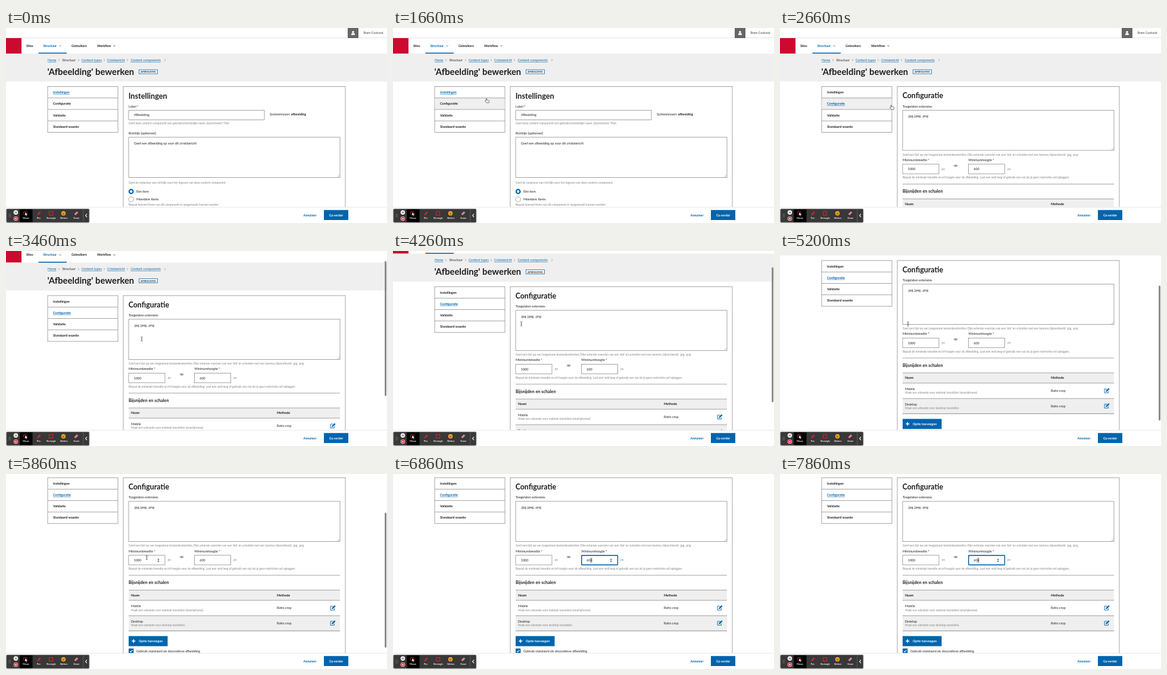
An HTML page for the animation above (8 s loop, 640x328 px).

```html
<!DOCTYPE html>
<html lang="nl">
<head>
<meta charset="utf-8">
<title>Afbeelding bewerken</title>
<style>
  html, body { margin: 0; width: 100%; height: 100%; overflow: hidden; background: #fff; }
  svg { display: block; width: 100vw; height: 100vh; }
  text { font-family: Lato, "Open Sans", sans-serif; white-space: pre; }
</style>
</head>
<body>
<svg id="stage" viewBox="0 0 640 328"></svg>
<script>
const BLUE = '#0064ad', INK = '#1f1f1f', GREY = '#858585', PALE = '#efefef', LINE = '#8c8c8c', RED = '#d0021b';
const LOOP = 8000;

// y is the vertical middle of the capitals
const text = (x, y, str, size = 5.45, fill = INK, extra = '') =>
  `<text x="${x}" y="${y + size * .36}" font-size="${size}" fill="${fill}" ${extra}>${str}</text>`;
const bold = (x, y, str, size = 5.45, fill = INK, extra = '') =>
  text(x, y, str, size, fill, 'font-weight="700" ' + extra);
const hint = (x, y, str) => text(x, y, str, 4.8, GREY);
const rect = (x, y, w, h, fill, extra = '') =>
  `<rect x="${x}" y="${y}" width="${w}" height="${h}" fill="${fill}" ${extra}/>`;
const box = (x, y, w, h, stroke = LINE, width = .8) =>
  rect(x, y, w, h, '#fff', `stroke="${stroke}" stroke-width="${width}"`);
const path = (d, stroke, width = 1, extra = 'fill="none"') =>
  `<path d="${d}" stroke="${stroke}" stroke-width="${width}" ${extra}/>`;
const circle = (x, y, r, fill, extra = '') => `<circle cx="${x}" cy="${y}" r="${r}" fill="${fill}" ${extra}/>`;
const group = (id, inner, extra = '') => `<g id="${id}" ${extra}>${inner}</g>`;
const link = (x, y, str) => text(x, y, str, 5.45, BLUE, 'text-decoration="underline"');
const required = (x, y, str) =>
  text(x, y, `${str} <tspan fill="${RED}" font-weight="700">*</tspan>`);
const down = (x, y, color) => path(`M${x - 1.5} ${y - .7}l1.5 1.5l1.5 -1.5`, color, .8);
const grip = (x, y) => path(`M${x - 4} ${y}l4 -4m-2 4l2 -2`, '#888', .5);

function header() {
  const chevrons = [89, 122, 165, 204, 267]
    .map(x => path(`M${x - .8} 52.4l1.6 1.6l-1.6 1.6`, '#666', .6)).join('');
  return rect(0, 0, 640, 43, '#fff') + rect(0, 16, 640, .8, '#dcdcdc')
    + rect(574, 0, 18, 17, '#666') + circle(583, 6.7, 1.8, '#fff')
    + path('M580 11.8v-1.2q0-2 2-2h2q2 0 2 2v1.2z', 'none', 0, 'fill="#fff"')
    + text(600.5, 8.2, 'Bram Coolvest', 5.2, '#444')
    + rect(0, 17, 26, 26, '#cc0a2f')
    + bold(34, 30, 'Sites') + bold(62.5, 30, 'Structuur', 5.4, BLUE) + down(91, 30, BLUE)
    + bold(110, 30, 'Gebruikers', 5.3) + bold(153, 30, 'Workflow', 5.3) + down(182, 30, INK)
    + rect(0, 43, 640, 47, PALE) + rect(54.5, 41.5, 47.5, 1.6, BLUE)
    + link(70, 54, 'Home') + text(94.5, 54, 'Structuur') + link(127, 54, 'Content types')
    + link(170, 54, 'Crisisbericht') + link(209.5, 54, 'Content components') + chevrons
    + bold(69.5, 73.6, "'Afbeelding' bewerken", 14.8)
    + box(223.4, 70.2, 31, 6.8, BLUE) + bold(226, 73.7, 'AFBEELDING', 4.2);
}

function menu(active) {
  const rows = ['Instellingen', 'Configuratie', 'Validatie', 'Standaard waarde'];
  return box(70, 98.5, 118, 77) + rows.map((name, i) => {
    const y = 98.5 + 19.25 * i;
    const style = i === active ? 'text-decoration="underline"' : '';
    return (i === 1 ? rect(70.4, y + .4, 117.2, 18.5, PALE, `class="hover" visibility="hidden"`) : '')
      + (i ? rect(70, y - .4, 118, .8, LINE) : '')
      + bold(79, y + 9.6, name, 5.45, i === active ? BLUE : INK, style);
  }).join('');
}

function settings() {
  return menu(0) + box(197, 98.5, 373, 400)
    + bold(205.7, 114.2, 'Instellingen', 12.7)
    + required(206, 131.6, 'Label')
    + box(206, 138.3, 228, 16.2) + text(215, 146.3, 'Afbeelding')
    + text(443, 145.2, 'Systeemnaam: <tspan font-weight="700">afbeelding</tspan>')
    + hint(206, 160.2, "Geef deze content component een gebruiksvriendelijke naam, bijvoorbeeld 'Titel'.")
    + text(206, 177.4, 'Richtlijn (optioneel)')
    + box(206, 183.8, 355, 67.6) + grip(560.4, 250.8)
    + text(215, 194, 'Geef een afbeelding op voor dit crisisbericht')
    + hint(206, 260, 'Geef de redacteur een richtlijn voor het ingeven van deze content component.')
    + circle(210.2, 275, 3.3, '#fff', `stroke="${BLUE}" stroke-width="2.2"`) + text(219, 275, 'Eén item')
    + circle(210.2, 288, 4.1, '#fff', `stroke="${LINE}" stroke-width=".7"`) + text(219, 288, 'Meerdere items')
    + hint(206, 297.4, 'Bepaal hoeveel items van dit component er aangemaakt kunnen worden');
}

const spinner = (id, x) => group(id,
  path(`M${x - 1.5} 236.6l1.5 -2l1.5 2zm0 1.6l1.5 2l1.5 -2z`, 'none', 0, `fill="${INK}"`), 'visibility="hidden"');

function numberField(x, label, value) {
  return required(x, 222, label) + box(x, 229, 61, 16.2)
    + text(x + 8.8, 237.3, value) + hint(x + 65.8, 237, 'px');
}

function option(y, name, target) {
  return text(210, y, name) + hint(210, y + 6.4, `Maak een uitsnede voor ${target}`)
    + text(455, y + 2.9, 'Ratio crop')
    + path(`M549.5 ${y - .2}h-4.4v6.6h6.4v-3`, BLUE, .9)
    + path(`M547.6 ${y + 4.2}l.3 -1.6l4 -4l1.3 1.3l-4 4z`, BLUE, .7, `fill="${BLUE}"`);
}

function config() {
  return menu(1) + box(197, 98.5, 373, 310)
    + bold(205.7, 113.9, 'Configuratie', 12.4)
    + text(206, 131.8, 'Toegelaten extensies')
    + box(206, 138.3, 355, 67.6) + grip(560.4, 205.3) + text(215, 148.3, '.jpg, jpeg, .png')
    + hint(206, 212.8, "Geef een lijst op van toegestane bestandsextenties. Elke extensie voorzien van een 'dot' en scheiden met een komma, bijvoorbeeld: .jpg, .png")
    + numberField(206, 'Minimumbreedte', '1000') + text(292, 231, 'op')
    + numberField(316.5, 'Minimumhoogte', '600')
    + rect(316.8, 229.2, 60.6, 15.8, 'none', `id="focus" stroke="${BLUE}" stroke-width="1.5" rx=".6" visibility="hidden"`)
    + spinner('spinWidth', 256) + spinner('spinHeight', 366.3)
    + hint(206, 251.4, 'Bepaal de minimale breedte en/of hoogte voor de afbeelding. Laat een veld leeg of gebruik een nul als je geen restricties wil opleggen.')
    + rect(206, 262.1, 355, .8, LINE)
    + bold(206, 274.8, 'Bijsnijden en schalen', 7.3)
    + rect(206, 287.5, 355, 17, PALE) + rect(206, 287.1, 355, .8, LINE) + rect(206, 304.2, 355, .8, LINE)
    + bold(210, 296, 'Naam') + bold(455, 296, 'Methode')
    + rect(206, 330.6, 355, 25.5, PALE) + rect(206, 330.2, 355, .8, LINE) + rect(206, 355.7, 355, 1, LINE)
    + option(314.8, 'Mobile', 'mobiele toestellen (smartphones)')
    + option(340.3, 'Desktop', 'desktop toestellen.')
    + rect(206, 364.9, 65.5, 17, BLUE) + path('M211.3 373.3h6m-3 -3v6', '#fff', 1.5)
    + bold(223, 373.4, 'Optie toevoegen', 5.4, '#fff')
    + rect(206, 385.9, 8.4, 8.4, BLUE, 'rx=".8"') + path('M208 390.1l1.6 1.7l3 -3.3', '#fff', 1.1)
    + text(219, 390.3, 'Gebruik standaard als decoratieve afbeelding');
}

function toolbar() {
  const dots = [0, 1, 2].map(i => circle(5.2, 313.3 + 2.2 * i, .5, '#aaa') + circle(7.2, 313.3 + 2.2 * i, .5, '#aaa')).join('');
  const labels = ['Mouse', 'Pen', 'Rectangle', 'Stickers', 'Eraser'].map((name, i) =>
    bold(33.5 + 21.2 * i, 319.6, name, 3.5, '#fff', 'text-anchor="middle"')).join('');
  return rect(.8, 304.3, 139, 22.8, '#383838', 'rx="1.5" stroke="#777" stroke-width=".8"') + dots
    + circle(16.5, 310.3, 3.7, '#fff') + path('M15.4 308.7v3.2m2.2 -3.2v3.2', '#333', .9)
    + circle(16.5, 320.6, 3.7, '#fff') + circle(16.5, 320.6, 3, '#e0202c') + rect(15.4, 319.5, 2.2, 2.2, '#fff')
    + rect(23, 305, 21.5, 21.5, '#000') + labels
    + circle(32.3, 311.3, 3, 'none', 'stroke="#d33" stroke-width=".8"')
    + path('M32 309.8v6l1.5 -1.3l1.1 2.2l1 -.5l-1 -2.1h1.9z', '#000', .4, 'fill="#fff"')
    + path('M52.5 315l.6 -2.3l3.6 -4l1.8 1.6l-3.7 4z', 'none', 0, 'fill="#e3222e"')
    + rect(72.6, 308.8, 6, 6, 'none', 'stroke="#d61f2b" stroke-width="1.2"')
    + circle(96.5, 311.8, 3.7, '#f5ae25') + path('M94.3 312.3q2.2 3.5 4.4 0z', 'none', 0, 'fill="#b8292a"')
    + circle(95.2, 310.7, .6, '#333') + circle(97.8, 310.7, .6, '#333')
    + path('M114.5 313.1l4.5 -4.6l2.4 2l-4.5 4.5z', 'none', 0, 'fill="#ee7f8e"')
    + rect(129.6, 305, .6, 21.5, '#777') + path('M136 312.6l-2.4 2.8l2.4 2.8', '#fff', 1.1);
}

function footer() {
  return rect(0, 301, 640, 27, '#fff') + rect(0, 301, 640, .7, '#dedede')
    + bold(499.5, 314.6, 'Annuleer', 5.4, BLUE)
    + rect(534, 306.2, 41, 16.8, BLUE) + bold(543, 314.6, 'Ga verder', 5.4, '#fff');
}

const cursors = {
  arrow: path('M0 0v7.6l1.8 -1.6l1.2 2.8l1.2 -.5l-1.2 -2.7h2.5z', '#fff', .6, 'fill="#111"'),
  hand: path('M-1.7 -3.2q.8 -.8 1.3 .2v2.2l3.2 .5q.9 .3 .8 1.3l-.5 2.8h-4.2l-2.2 -3q0 -1 1 -.7l.6 .5z', '#222', .6, 'fill="#fff"'),
  beam: path('M-1.6 -3.5q1.4 0 1.6 .8q.2 -.8 1.6 -.8m-1.6 .8v5.4m-1.6 .8q1.4 0 1.6 -.8q.2 .8 1.6 .8m-2.4 -3.2h1.6', '#333', .7)
};

const stage = document.getElementById('stage');
stage.innerHTML = group('page', header() + group('settings', settings()) + group('config', config()))
  + rect(636.2, 0, 2.8, 227, '#858585', 'id="thumb" rx="1.4"')
  + footer() + toolbar()
  + group('pointer', Object.entries(cursors).map(([id, shape]) => group(id, shape)).join(''));

const el = id => document.getElementById(id);
const show = (node, on) => node.setAttribute('visibility', on ? 'visible' : 'hidden');
const display = (id, on) => el(id).style.display = on ? '' : 'none';
const move = (id, x, y) => el(id).setAttribute('transform', `translate(${x} ${y})`);
const hover = document.querySelectorAll('.hover');

const scrollKeys = [[2860, 0], [3460, 23.5], [4060, 38.5], [4860, 38.5], [5000, 74], [5200, 82.5], [5400, 92.3]];
const pointerKeys = [[400, 60, 300], [1330, 158, 122], [2330, 158, 122], [3060, 228, 148], [3530, 228, 148],
  [3930, 215.7, 122.5], [5260, 215, 122.5], [5860, 236.5, 140.5], [6660, 333, 145]];

function sample(keys, t) {
  const next = keys.findIndex(k => k[0] > t);
  if (next === 0) return keys[0].slice(1);
  if (next < 0) return keys[keys.length - 1].slice(1);
  const [a, b] = [keys[next - 1], keys[next]];
  const u = (t - a[0]) / (b[0] - a[0]), e = u * u * (3 - 2 * u);
  return a.slice(1).map((v, i) => v + (b[i + 1] - v) * e);
}

function recordedTime(t) {
  const [offset, short] = t >= 860 && t < 4600 ? [60, 70] : [0, 60];
  const rest = (t - offset) % 200;
  return t - rest + (rest >= short ? short : 0);
}

function draw(now) {
  const t = recordedTime(now % LOOP);
  const [scroll] = sample(scrollKeys, t);
  const [x, y] = sample(pointerKeys, t);
  const onMenu = x > 70 && x < 188 && y > 98 && y < 176;
  const onField = t > 2330 && (x > 206 && x < 267 || x > 316 && x < 561);
  const kind = onMenu ? 'hand' : onField ? 'beam' : 'arrow';

  move('page', 0, -scroll);
  move('thumb', 0, .5 + scroll * .7);
  el('thumb').setAttribute('opacity', t < 2860 ? 0 : Math.max(0, Math.min(1, (6130 - t) / 200)));
  display('settings', t < 2330);
  display('config', t >= 2330);
  hover.forEach(node => show(node, onMenu && y > 117.7 && y < 137));

  display('pointer', t >= 400);
  move('pointer', x, y);
  for (const id in cursors) display(id, id === kind);

  show(el('spinWidth'), t >= 5660 && x < 267);
  show(el('spinHeight'), t >= 5660 && x > 316);
  show(el('focus'), t >= 6860);
}

const start = performance.now();
function tick() {
  draw(performance.now() - start);
  requestAnimationFrame(tick);
}
tick();
</script>
</body>
</html>
```
